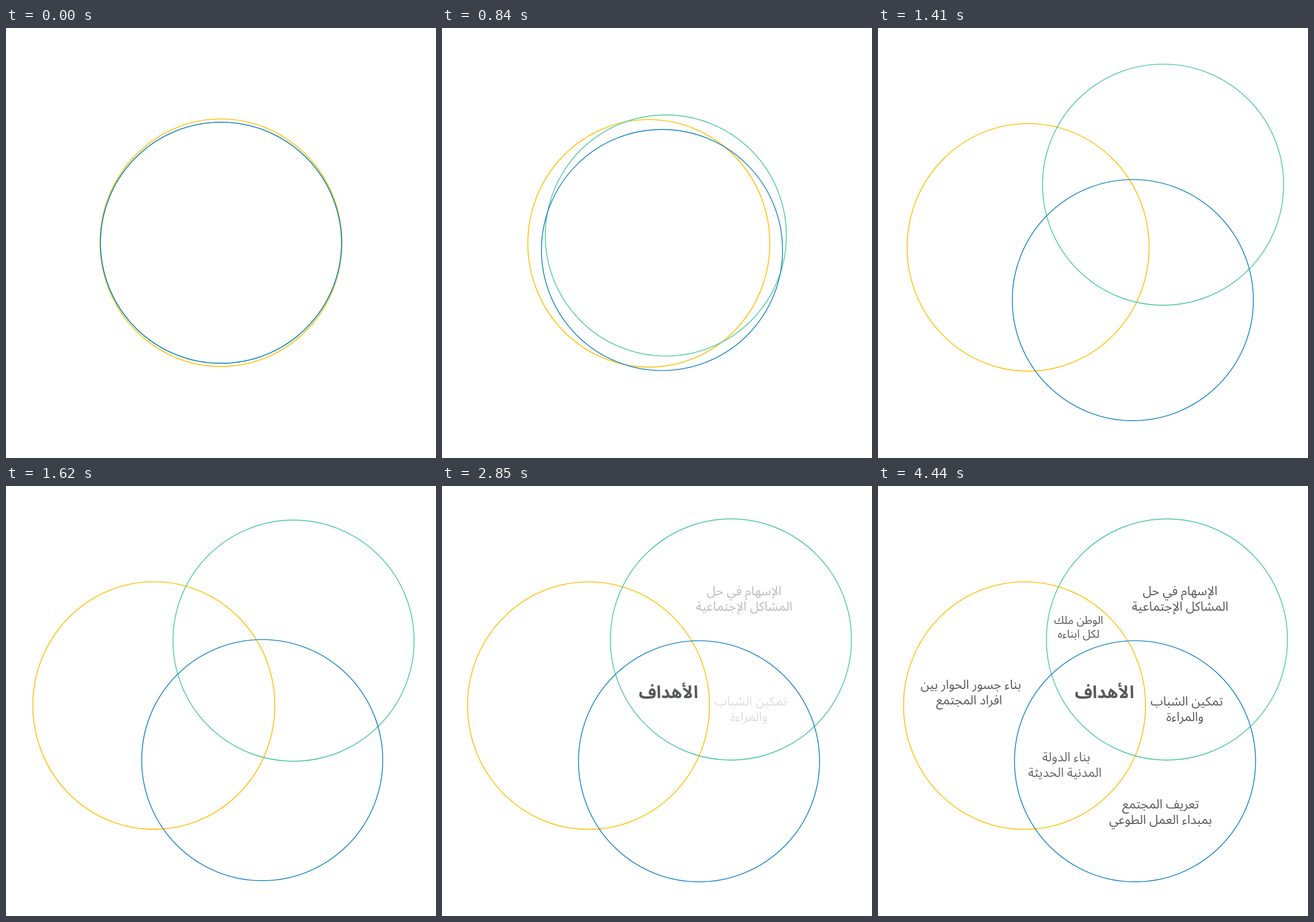
An HTML page with a canvas for the animation above (6.12 s loop, 748 by 748 pixels).

```html
<!DOCTYPE html>
<html lang="ar">
<head>
<meta charset="utf-8">
<title>الأهداف</title>
<style>
  html, body { margin: 0; width: 100%; height: 100%; overflow: hidden; background: #fff; }
  canvas { display: block; width: 748px; height: 748px; }
</style>
</head>
<body>
<canvas id="stage" width="748" height="748"></canvas>
<script>
const ctx = document.getElementById('stage').getContext('2d');
const LOOP = 6120;
const INK = '#58595b';
const FAMILY = '"Noto Sans Arabic", "Noto Sans", "Open Sans", sans-serif';
const START = { x: 374, y: 373.6 };

const circles = [
  { x: 254.9, y: 382, rx: 210.5, ry: 215.3, color: '#ffc20e', width: 1.6 },
  { x: 502.6, y: 267, rx: 209.7, ry: 209.7, color: '#45c69b', width: 1.4 },
  { x: 447.1, y: 478.8, rx: 209.7, ry: 209.7, color: '#0a7cc2', width: 1.4 }
];

// Lines are [text, centre x, baseline]; labels appear in this order.
const labels = [
  { size: 22, lines: [['الإسهام في حل', 525.5, 190], ['المشاكل الإجتماعية', 525.5, 217]] },
  { size: 22, lines: [['تمكين الشباب', 537, 382], ['والمراءة', 534, 409]] },
  { size: 22, lines: [['تعريف المجتمع', 491.5, 561], ['بمبداء العمل الطوعي', 491.5, 588]] },
  { size: 22, lines: [['بناء جسور الحوار بين', 161.5, 353], ['افراد المجتمع', 158.5, 380]] },
  { size: 19.5, lines: [['الوطن ملك', 349, 240], ['لكل ابناءه', 349, 264]] },
  { size: 22, limit: 0.92, lines: [['بناء الدولة', 327.5, 479], ['المدنية الحديثة', 325, 506]] }
];

const clamp = v => Math.min(1, Math.max(0, v));
const progress = (t, start, duration) => clamp((t - start) / duration);
const mix = (a, b, k) => a + (b - a) * k;

function bezier(x1, y1, x2, y2) {
  const at = (a, b, s) => 3 * a * s * (1 - s) ** 2 + 3 * b * s * s * (1 - s) + s ** 3;
  return x => {
    if (x <= 0 || x >= 1) return clamp(x);
    let low = 0, high = 1;
    for (let i = 0; i < 30; i++) {
      const mid = (low + high) / 2;
      if (at(x1, x2, mid) < x) low = mid; else high = mid;
    }
    return at(y1, y2, (low + high) / 2);
  };
}

const spread = bezier(1, 0, 0, 1);
const ease = bezier(0.25, 0.1, 0.25, 1);

function drawCircle(c, k) {
  ctx.strokeStyle = c.color;
  ctx.lineWidth = c.width;
  ctx.beginPath();
  ctx.ellipse(mix(START.x, c.x, k), mix(START.y, c.y, k), c.rx, c.ry, 0, 0, Math.PI * 2);
  ctx.stroke();
}

function drawTitle(scale) {
  if (scale <= 0) return;
  ctx.save();
  ctx.translate(394, 357.5);
  ctx.scale(scale, scale);
  ctx.font = `700 30px ${FAMILY}`;
  ctx.fillText('الأهداف', 0, 11.5);
  ctx.restore();
}

function drawLabel(label, alpha) {
  if (alpha <= 0) return;
  ctx.globalAlpha = Math.min(alpha, label.limit || 1);
  ctx.font = `400 ${label.size}px ${FAMILY}`;
  for (const [text, x, y] of label.lines) ctx.fillText(text, x, y);
  ctx.globalAlpha = 1;
}

function draw(t) {
  ctx.fillStyle = '#fff';
  ctx.fillRect(0, 0, 748, 748);
  const k = spread(progress(t, 15, 2025));
  circles.forEach(c => drawCircle(c, k));

  ctx.fillStyle = INK;
  ctx.textAlign = 'center';
  ctx.textBaseline = 'alphabetic';
  ctx.direction = 'rtl';
  drawTitle(ease(progress(t, 1822, 720)));
  labels.forEach((label, i) => drawLabel(label, progress(t, 2450 + i * 200, 1000)));
}

const began = performance.now();
function tick() {
  draw((performance.now() - began) % LOOP);
  requestAnimationFrame(tick);
}
tick();
</script>
</body>
</html>
```
